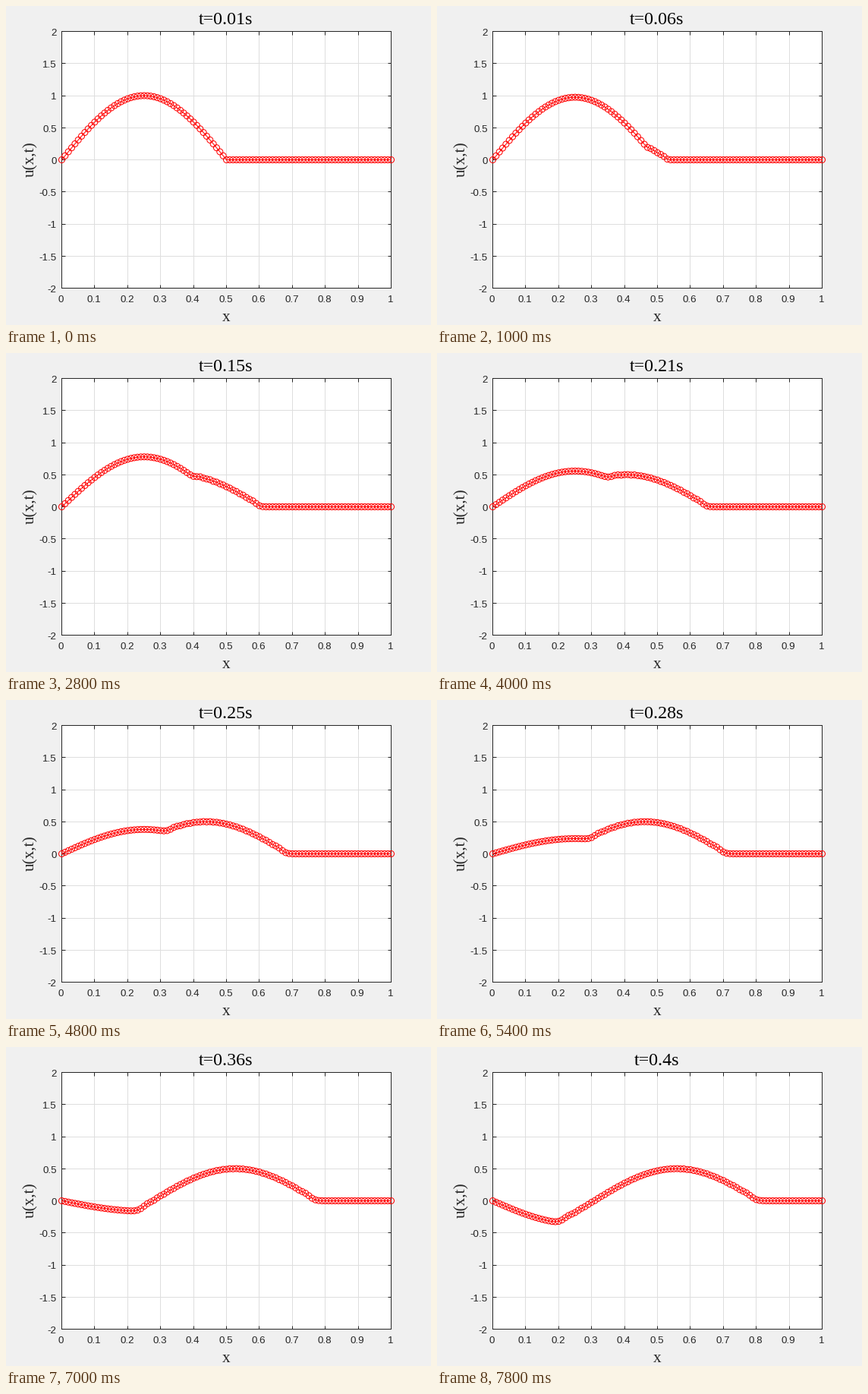
A matplotlib script for the animation above (8 s loop, 560 px wide and 420 px high).

```python
import numpy as np
import matplotlib.pyplot as plt
from matplotlib.animation import FuncAnimation
from matplotlib.transforms import Affine2D

W, H, DPI = 560, 420, 100
LEFT, RIGHT, TOP, BOTTOM = 73, 507, 33, 371
FRAMES, INTERVAL = 40, 200
DT, COURANT = 0.01, 0.8
INK = "#262626"


def pt(px):
    """Pixels to points at the figure's resolution."""
    return px * 72 / DPI


def solve(x, steps):
    """Explicit scheme for the wave equation, released from rest."""
    start = np.where(x < 0.5, np.sin(2 * np.pi * x), 0.0)
    rows = [start, start.copy()]
    while len(rows) < steps:
        prev, cur = rows[-2:]
        new = np.zeros_like(cur)
        bend = cur[2:] - 2 * cur[1:-1] + cur[:-2]
        new[1:-1] = 2 * cur[1:-1] - prev[1:-1] + COURANT**2 * bend
        rows.append(new)
    return rows


x = np.linspace(0, 1, 101)
waves = solve(x, FRAMES)

fig = plt.figure(figsize=(W / DPI, H / DPI), dpi=DPI, facecolor="#f0f0f0")
ax = fig.add_axes([LEFT / W, 1 - BOTTOM / H,
                   (RIGHT - LEFT) / W, (BOTTOM - TOP) / H])
ax.set(xlim=(0, 1), ylim=(-2, 2), facecolor="white")
ax.set_axisbelow(True)
ax.grid(color="#dedede", lw=pt(1))
ax.set_xticks(np.arange(11) / 10)
ax.set_yticks(np.arange(-4, 5) / 2)
ax.tick_params(direction="in", top=True, right=True, length=pt(4.5),
               width=pt(1), color=INK, labelbottom=False, labelleft=False)
for spine in ax.spines.values():
    spine.set(color=INK, linewidth=pt(1))


def label(px, py, text, size, family="Liberation Serif", color=INK, **kw):
    kw = {"ha": "center", "va": "baseline", **kw}
    return fig.text(px / W, 1 - py / H, text, fontsize=pt(size),
                    family=family, color=color, **kw)


for v in ax.get_xticks():
    label(LEFT + v * (RIGHT - LEFT) - 0.5, 390, f"{v:g}", 13.33,
          "Liberation Sans")
for v in ax.get_yticks():
    label(66.7, 207.8 - v * (BOTTOM - TOP) / 4, f"{v:g}", 13.33,
          "Liberation Sans", ha="right")

label(290, 415, "x", 21.33)
label(37, 202, "u(x,t)", 21.33, rotation=90, rotation_mode="anchor")
title = label(290, 24, "", 24, color="black")

# Half a pixel right and down puts the curve on pixel centres.
centred = ax.transData + Affine2D().translate(0.5, -0.5)
curve, = ax.plot(x, waves[0], color="red", lw=pt(1), transform=centred,
                 clip_on=False, zorder=5)
rings = ax.scatter(x, waves[0], s=pt(8)**2, facecolors="none",
                   edgecolors="red", linewidths=pt(1), clip_on=False,
                   zorder=6)
rings.set_offset_transform(centred)


def draw(i):
    curve.set_ydata(waves[i])
    rings.set_offsets(np.column_stack([x, waves[i]]))
    title.set_text(f"t={(i + 1) * DT:.3g}s")
    return curve, rings, title


anim = FuncAnimation(fig, draw, frames=FRAMES, interval=INTERVAL,
                     repeat=True, repeat_delay=0)
plt.show()
```
